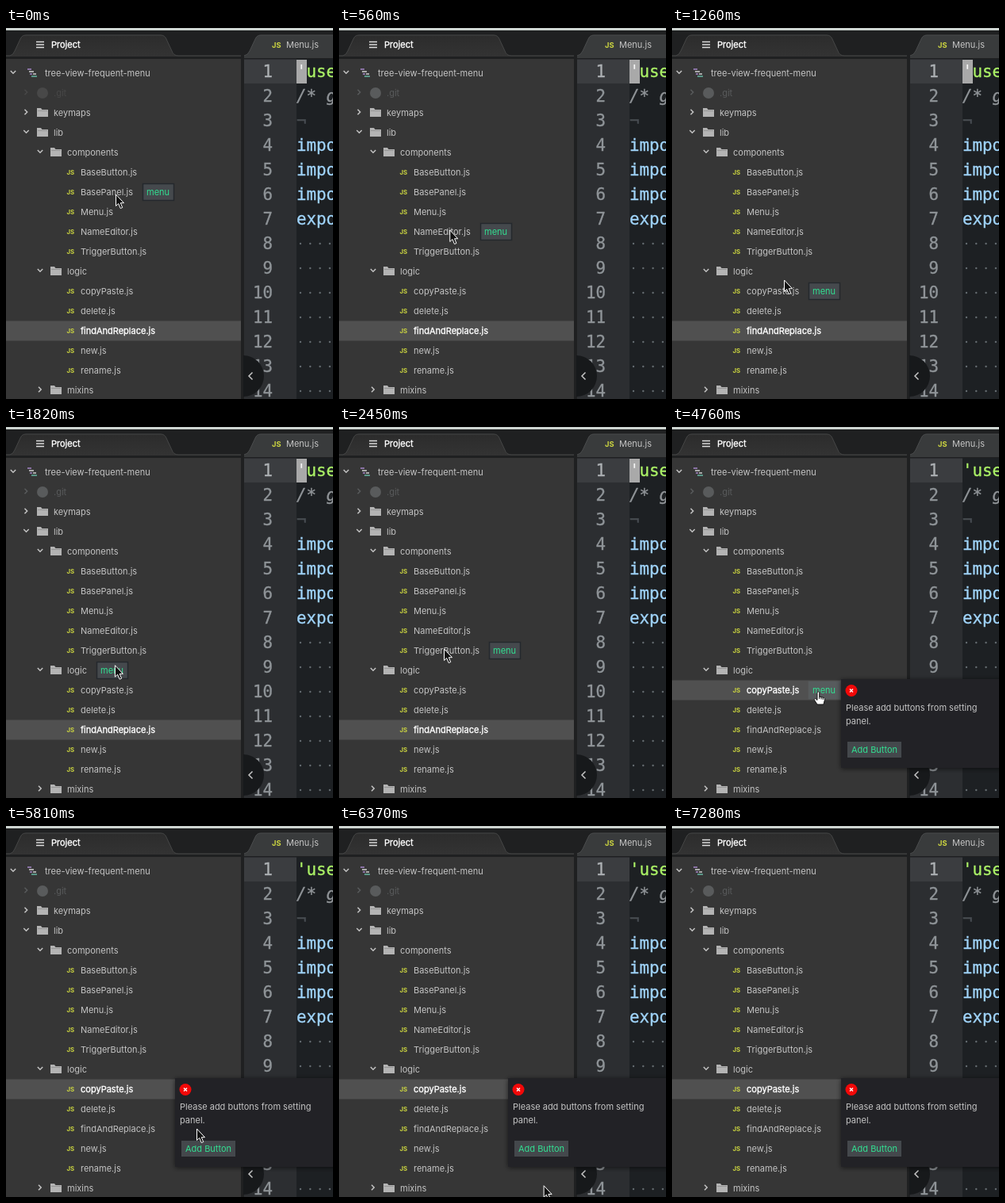
An HTML page that plays this animation: 412 by 468 pixels, repeating every 7350 ms.

```html
<!DOCTYPE html>
<html lang="en">
<head>
<meta charset="utf-8">
<title>Tree view menu</title>
<style>
html, body { margin: 0; width: 100%; height: 100%; overflow: hidden; background: #1d2023; }
svg { display: block; }
text { font: 11px Inter, "Open Sans", sans-serif; fill: #c4c4c4; white-space: pre; }
.code text { font: 20.8px "DejaVu Sans Mono", monospace; stroke-width: .35; }
.js { font-weight: 700; fill: #cdd640; }
.on { fill: #fff; stroke: #fff; stroke-width: .35; }
.green { fill: #32e092; }
.line { fill: none; stroke: #c4c4c4; stroke-width: 1.5; }
</style>
</head>
<body>
<svg id="stage" width="412" height="468" viewBox="0 0 412 468">
  <defs>
    <linearGradient id="tab" x2="0" y2="1"><stop stop-color="#2c2c2c"/><stop offset="1" stop-color="#333"/></linearGradient>
    <filter id="shadow" x="-20%" y="-20%" width="140%" height="140%"><feDropShadow dx="0" dy="1" stdDeviation="3" flood-opacity=".6"/></filter>
  </defs>
  <rect width="412" height="468" fill="#1f2021"/>
  <rect width="412" height="3" fill="#cdd4d0"/>
  <rect y="39" width="296" height="429" fill="#363636"/>
  <path d="M0 36V35H5Q9 34 11 29L18 14Q20 9 25 9H195Q200 9 202 14L209 29Q211 35 217 35H296V36Z" fill="url(#tab)"/>
  <path d="M0 35H5Q9 34 11 29L18 14Q20 9 25 9H195Q200 9 202 14L209 29Q211 35 217 35H296" fill="none" stroke="#454646"/>
  <path d="M38 17.5H48M38 21H48M38 24.5H48" stroke="#ddd" stroke-width="1.7"/>
  <text x="57" y="25" class="on">Project</text>

  <path d="M300 38V35Q305 34 307 29L314 14Q316 9 321 9H412V38Z" fill="#393b3c"/>
  <path d="M300 35Q305 34 307 29L314 14Q316 9 321 9H412" fill="none" stroke="#4a4c4d"/>
  <text x="335" y="25" class="js" style="font-size:9.3px">JS</text>
  <text x="353" y="25">Menu.js</text>
  <rect x="300" y="39" width="112" height="429" fill="#1d2023"/>
  <rect x="300" y="39" width="66" height="429" fill="#2c2e31"/>
  <rect x="300" y="40" width="66" height="30" fill="#3b3d40"/>
  <g class="code">
    <g id="code"></g>
    <g id="caret">
      <rect x="366" y="40" width="13" height="30" fill="#a9a9a9"/>
      <text x="366" y="62" style="fill:#f4f4f4">'</text>
    </g>
  </g>
  <path d="M299 413A26 26 0 0 1 299 465Z" fill="#17191b"/>
  <path d="M310.500 434.500L306 439L310.500 443.500" class="line"/>

  <rect id="selected" width="296" height="25" fill="#505050"/>
  <g id="tree"></g>
  <g id="tag">
    <rect x=".5" y=".5" width="39" height="21" fill="#45494d" stroke="#24282d" stroke-width="1.500"/>
    <text x="5" y="15" class="green">menu</text>
  </g>
  <g id="popup">
    <rect x="213" y="318" width="205" height="112" fill="#202226" filter="url(#shadow)"/>
    <circle cx="226" cy="332.500" r="7.500" fill="#f20808"/>
    <path d="M224 330.500L228 334.500M228 330.500L224 334.500" stroke="#fff" stroke-width="1.400"/>
    <text x="219" y="358">Please add buttons from setting</text>
    <text x="219" y="375">panel.</text>
    <rect x="221" y="397" width="68" height="20" fill="#44484c"/>
    <text x="226" y="411" class="green">Add Button</text>
  </g>
  <path id="arrow" d="M0 0V14.500L3.200 11.500L5.700 17.500L8.200 16.500L5.800 10.700H10Z" fill="#111" stroke="#fff"/>
  <path id="hand" d="M-1.500 1.200C-1.500 -.6 1.200 -.6 1.200 1.200V6L7 7.500Q8.300 8.200 7.800 10.500L6.500 16H-1.500L-5 10.500C-5.800 8.500 -4 8 -3 9.200L-1.500 10.500ZM1.200 6V9M3.500 7V9.500M5.700 7.500V10" fill="#fff" stroke="#111"/>
</svg>
<script>
const LOOP = 7350, STEP = 70, CLICK = 4550;
const $ = id => document.getElementById(id);

function add(parent, name, attrs, content = "") {
  const el = document.createElementNS("http://www.w3.org/2000/svg", name);
  for (const key in attrs) el.setAttribute(key, attrs[key]);
  el.textContent = content;
  return parent.appendChild(el);
}

// Editor: text and colour
const lines = [
  ["'use", "#aaf066"], ["/* g", "#92969a"], ["¬", "#484d52"],
  ["impo", "#a0d4fa"], ["impo", "#a0d4fa"], ["impo", "#a0d4fa"], ["expo", "#a0d4fa"]
];
for (let i = 0; i < 14; i++) {
  const y = 62 + 31 * i;
  const write = (x, color, content, extra) =>
    add($("code"), "text", { x, y, style: `fill:${color};stroke:${color}`, ...extra }, content);
  write(336, i ? "#8f9498" : "#acb0b3", String(i + 1), { "text-anchor": "end" });
  if (i < lines.length) {
    const [content, color] = lines[i];
    write(366, color, content, { "font-style": "normal" }).style.fontStyle = i === 1 ? "italic" : "normal";
  } else {
    for (let x = 371; x < 412; x += 12.3) add($("code"), "circle", { cx: x, cy: y - 7, r: 1.2, fill: "#646b70" });
  }
}

// Tree: depth, kind, name
const rows = [
  [0, "root", "tree-view-frequent-menu"], [1, "git", ".git"], [1, "closed", "keymaps"],
  [1, "open", "lib"], [2, "open", "components"],
  ...["BaseButton", "BasePanel", "Menu", "NameEditor", "TriggerButton"].map(n => [3, "js", n + ".js"]),
  [2, "open", "logic"],
  ...["copyPaste", "delete", "findAndReplace", "new", "rename"].map(n => [3, "js", n + ".js"]),
  [2, "closed", "mixins"]
];
const gitParts = [];
const labels = rows.map(([depth, kind, name], i) => {
  const tree = $("tree"), y = 57 + 25 * i;
  const x = [49, 60, 77, 94][depth], cx = [9, 25.5, 43, 0][depth];
  const draw = (d, extra) => add(tree, "path", { d, class: "line", ...extra });
  if (kind === "js") {
    add(tree, "text", { x: 76.5, y: y + 2.6, class: "js", style: "font-size:7.8px" }, "JS");
  } else {
    const open = kind === "root" || kind === "open";
    const chevron = draw(open ? `M${cx - 3.2} ${y - 3}l3.2 3.2 3.2-3.2` : `M${cx - 2} ${y - 4.2}l3.2 3.2-3.2 3.2`);
    if (kind === "git") {
      gitParts.push(chevron, add(tree, "circle", { cx: 46, cy: y, r: 7 }));
    } else if (kind === "root") {
      draw(`M27 ${y - 5}h5M30 ${y + 1}h3`, { style: "stroke:#a788c9" });
      draw(`M29 ${y - 2}h6M34 ${y + 1}h4`, { style: "stroke:#d0d0d0" });
      draw(`M32 ${y + 4}h7`, { style: "stroke:#65b5a0" });
    } else {
      add(tree, "path", { d: `M${x - 21} ${y - 6}h5l1.500 2h7.500v9h-14Z`, fill: "#b4b4b4" });
      draw(`M${x - 20} ${y - 2.5}h12`, { style: "stroke:#888;stroke-width:.7" });
    }
  }
  const label = add(tree, "text", { x, y: y + 4 }, name);
  if (kind === "git") gitParts.push(label);
  return { x, y, label };
});

// Pointer path: time, x, y
const path = [
  [0, 138.5, 210], [1260, 141.5, 318], [2450, 132.5, 280], [3710, 158.5, 337],
  [4480, 184.5, 334], [5250, 184.5, 334], [5810, 240.5, 382], [6020, 241, 384], [6580, 266, 486], [LOOP, 266, 486]
];
function pointer(t) {
  const k = path.findIndex(p => p[0] > t);
  const [t0, x0, y0] = path[k - 1], [t1, x1, y1] = path[k];
  const u = (t - t0) / (t1 - t0), e = u * u * (3 - 2 * u);
  return [x0 + (x1 - x0) * e, y0 + (y1 - y0) * e];
}

const show = (id, visible) => $(id).setAttribute("visibility", visible ? "visible" : "hidden");
const move = (id, x, y) => $(id).setAttribute("transform", `translate(${x} ${y})`);

function render(now) {
  const t = Math.floor((now % LOOP) / STEP) * STEP;
  const [x, y] = pointer(t), clicked = t >= CLICK;
  const chosen = clicked ? 11 : 13;
  const hover = Math.floor((y - 42.5) / 25);
  const hovered = x < 212 && labels[hover];
  const onTag = hovered && x >= 172 && hover === 11;

  labels.forEach((row, i) => row.label.setAttribute("class", i === chosen ? "on" : ""));
  $("selected").setAttribute("y", labels[chosen].y - 12.5);
  const dim = t < STEP ? "#484848" : "#595b5c";
  gitParts.forEach((el, i) => { el.style[i ? "fill" : "stroke"] = dim; });

  show("tag", hovered);
  if (hovered) move("tag", Math.round(hovered.x + hovered.label.getComputedTextLength() + 12), hovered.y - 11);
  const box = $("tag").firstElementChild;
  box.setAttribute("fill", onTag ? "#575b5d" : "#45494d");
  box.setAttribute("stroke", onTag ? "#575b5d" : "#24282d");

  show("popup", clicked);
  show("caret", !clicked);
  show("arrow", !onTag);
  show("hand", onTag);
  move("arrow", x, y);
  move("hand", x, y);
}

const start = performance.now();
(function tick() {
  render(performance.now() - start);
  requestAnimationFrame(tick);
})();
</script>
</body>
</html>
```
